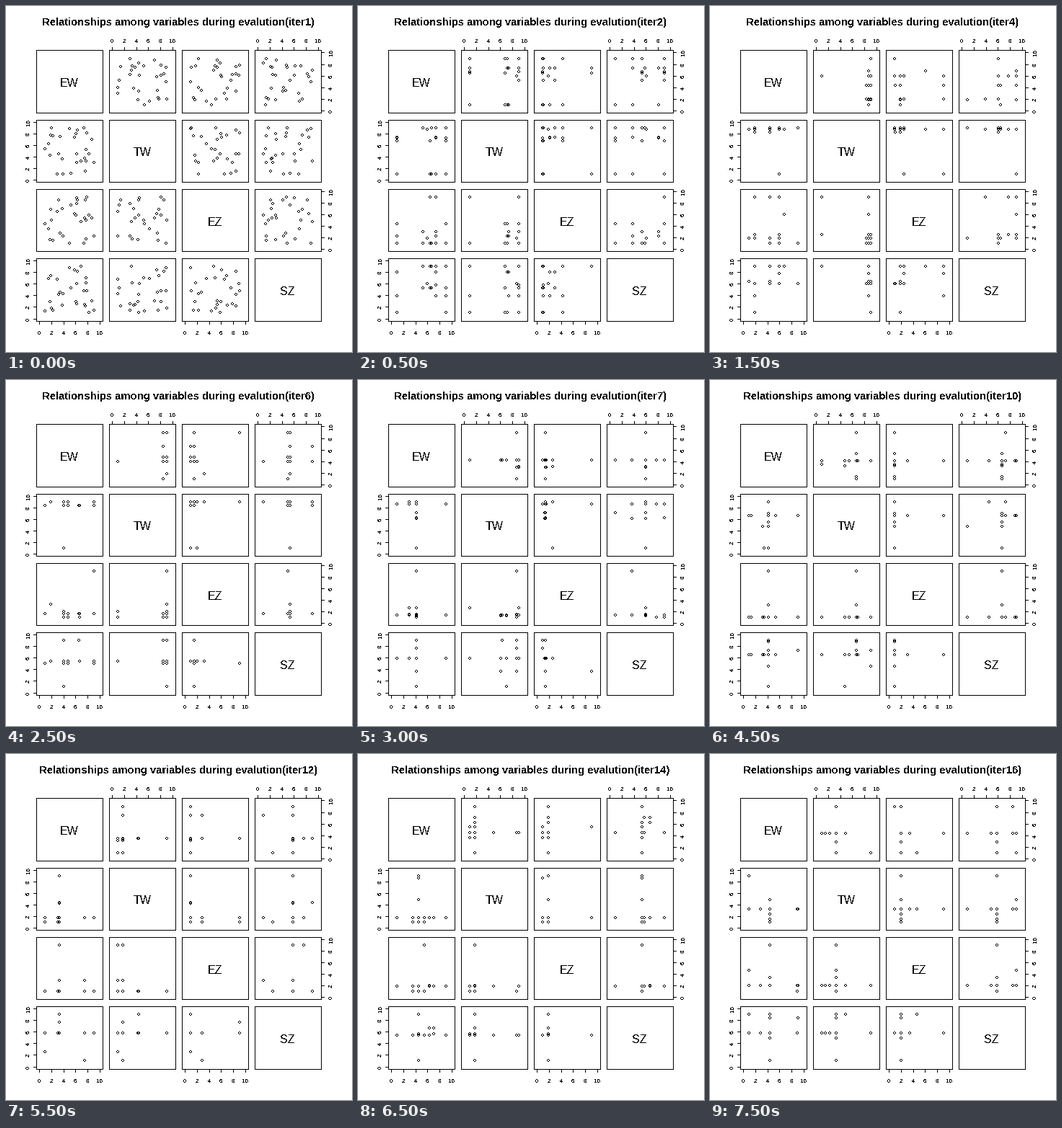
A matplotlib script for the animation above (8 s loop, 480 by 480 pixels).

```python
import numpy as np
import matplotlib.pyplot as plt
from matplotlib.animation import FuncAnimation
from matplotlib.collections import PolyCollection

SIZE, GENERATIONS, LINE = 480, 16, 9.504
NAMES = ["EW", "TW", "EZ", "SZ"]

# Panel geometry in pixels, margins counted in text lines
PITCH_X = (SIZE - 8 * LINE) / 4
PITCH_Y = (SIZE - 10 * LINE) / 4
W, H = PITCH_X - LINE, PITCH_Y - LINE
LEFT = 4.5 * LINE + PITCH_X * np.arange(4)
TOP = 6.5 * LINE + PITCH_Y * np.arange(4)

# Best individual at a few generations, one row per variable
KEYS = [4, 6, 9, 12, 14, 16]
BEST = [[6, 4, 4.5, 3.4, 4.5, 4.35],
        [8.7, 8.4, 9, 1.8, 1.8, 3.3],
        [1.9, 1.6, 1, 1, 1.9, 2.05],
        [6.1, 5.4, 7, 5.8, 5.4, 5.85]]


def population(gen):
    """Random at first, then mutants that share ever more with the best."""
    rng = np.random.default_rng(gen)
    count = 18 + 10 // gen
    if gen == 1:
        people = rng.uniform(0, 1, (count, 4))
        low, high = people.min(axis=0), people.max(axis=0)
        return 1 + 8 * (people - low) / (high - low)
    best = np.array([np.interp(gen, KEYS, row) for row in BEST])
    spread = rng.normal(best, 2.5, (count // 4, 4)).clip(1, 9)
    pool = np.vstack([np.full(4, 1), np.full(4, 9), spread])
    people = np.tile(best, (count + 1, 1))
    for i in range(count):
        mutated = rng.random(4) < 2 / gen
        mutated[i % 4] = True
        genes = pool[rng.integers(len(pool), size=4), np.arange(4)]
        genes[i % 4] = pool[i // 4, i % 4]
        people[i, mutated] = genes[mutated]
    return people


def px(col, v):
    return np.floor(LEFT[col] + W * (v + 0.4) / 10.8)


def py(row, v):
    return np.floor(TOP[row] + H * (10.4 - v) / 10.8)


def rect(x, y, w, h):
    return [(x, y), (x + w, y), (x + w, y + h), (x, y + h)]


def ring(x, y):
    return [rect(x - 1, y - 2, 2, 1), rect(x - 1, y + 1, 2, 1),
            rect(x - 2, y - 1, 1, 2), rect(x + 1, y - 1, 1, 2)]


def label(x, y, text, size, **kw):
    return ax.text(x, y, text, fontsize=size, ha="center", va="baseline",
                   rotation_mode="anchor", **kw)


plt.rcParams.update({"font.family": "Liberation Sans", "text.antialiased": False})
fig = plt.figure(figsize=(SIZE / 72, SIZE / 72), dpi=72, facecolor="white")
ax = fig.add_axes([0, 0, 1, 1])
ax.set(xlim=(0, SIZE), ylim=(SIZE, 0))
ax.axis("off")

marks = []
for row in range(4):
    for col in range(4):
        l, t = np.floor([LEFT[col], TOP[row]])
        r, b = np.floor([LEFT[col] + W, TOP[row] + H])
        marks += [rect(l, t, r - l + 1, 1), rect(l, b, r - l + 1, 1),
                  rect(l, t, 1, b - t + 1), rect(r, t, 1, b - t + 1)]

for i, name in enumerate(NAMES):
    label(LEFT[i] + W / 2 - 0.5, round(TOP[i] + H / 2) + 7, name, 16)
    for v in range(0, 11, 2):
        x, y = px(i, v), py(i, v)
        if i % 2:
            marks += [rect(x, 57, 1, 5), rect(38, y, 5, 1)]
            label(x, 51, v, 8)
            label(33, y + 0.5, v, 8, rotation=90)
        else:
            marks += [rect(x, 437, 1, 5), rect(437, y, 5, 1)]
            label(x, 456, v, 8)
            label(453, y + 0.5, v, 8, rotation=90)

solid = dict(facecolors="black", linewidths=0, antialiaseds=False)
ax.add_collection(PolyCollection(marks, **solid), autolim=False)
dots = PolyCollection([], **solid)
ax.add_collection(dots, autolim=False)
title = label(239, 27, "", 14.85, weight="bold")


def update(frame):
    people = population(frame + 1)
    title.set_text(f"Relationships among variables during evalution(iter{frame + 1})")
    dots.set_verts([part
                    for row in range(4) for col in range(4) if row != col
                    for p in people
                    for part in ring(px(col, p[col]), py(row, p[row]))])
    return dots, title


anim = FuncAnimation(fig, update, frames=GENERATIONS, interval=500,
                     repeat=True, repeat_delay=0)
plt.show()
```
